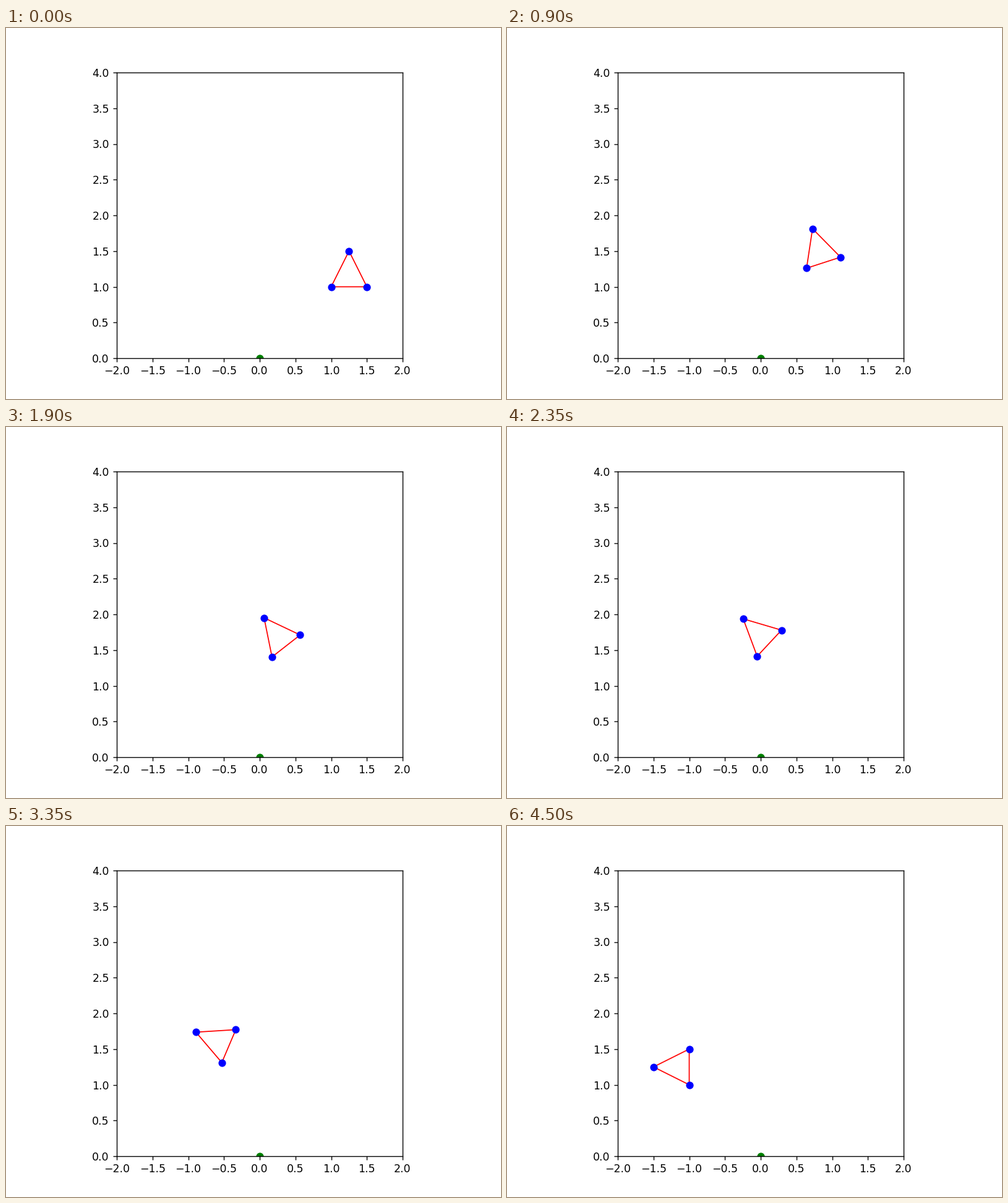
Recreate the animation shown at these times as a matplotlib script. Size 800 px wide and 600 px high, loop 4550 ms.

```python
import numpy as np
import matplotlib.pyplot as plt
from matplotlib.animation import FuncAnimation

FRAMES = 91
INTERVAL = 50
TRIANGLE = np.array([[1, 1], [1.5, 1], [1.25, 1.5]])


def rotated(points, degrees):
    """Rotate points counter-clockwise about the origin."""
    a = np.radians(degrees)
    c, s = np.cos(a), np.sin(a)
    return points @ np.array([[c, s], [-s, c]])


fig, ax = plt.subplots(figsize=(6.4, 4.8), dpi=125)
ax.set_xlim(-2, 2)
ax.set_ylim(0, 4)
ax.set_aspect("equal")

outline = plt.Polygon(TRIANGLE, closed=True, fill=False, edgecolor="red", linewidth=1)
ax.add_patch(outline)
corners, = ax.plot(*TRIANGLE.T, "bo")
pivot, = ax.plot([0], [0], "go")


def update(frame):
    points = rotated(TRIANGLE, frame)
    outline.set_xy(points)
    corners.set_data(*points.T)
    return outline, corners


anim = FuncAnimation(fig, update, frames=FRAMES, interval=INTERVAL,
                     repeat=True, repeat_delay=0, blit=False)
plt.show()
```
